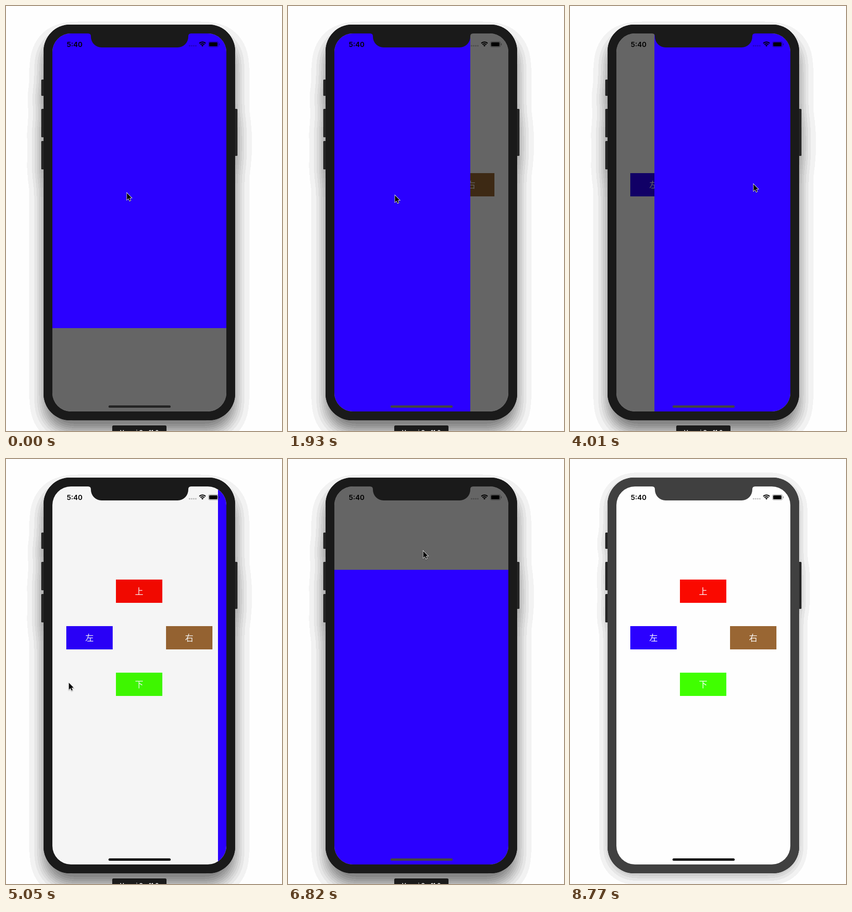
Animation of 595 by 913 pixels, one loop 8.87 s. Source, as an HTML page with a canvas:

```html
<!DOCTYPE html>
<html lang="zh">
<head>
<meta charset="utf-8">
<title>Slide-in panels</title>
<style>
  html, body { margin: 0; width: 100%; height: 100%; overflow: hidden; background: #fefefe; }
  canvas { display: block; }
</style>
</head>
<body>
<canvas id="stage" width="595" height="913"></canvas>
<script>
const W = 595, H = 913;
const LOOP = 8870, TICK = 148.1, BLUR_AT = 8770;
const BLUE = 'rgb(43,0,255)';
const ctx = document.getElementById('stage').getContext('2d');

const screen = { x: 100, y: 59, w: 375, h: 812 };
const PANEL_W = 293, PANEL_H = 633;

const buttons = [
  { text: '上', x: 237, y: 259, color: 'rgb(250,9,0)' },
  { text: '左', x: 130, y: 359, color: BLUE },
  { text: '右', x: 345, y: 359, color: 'rgb(153,102,51)' },
  { text: '下', x: 237, y: 459, color: 'rgb(64,255,0)' }
];

// Times are in ticks: first shaded tick, start of the closing slide.
const menus = [
  { side: 'top', open: -9, close: 4.3 },
  { side: 'left', open: 11, close: 18.54 },
  { side: 'right', open: 26, close: 32.4 },
  { side: 'bottom', open: 40, close: 47.2 }
];
const CLOSE_TICKS = 1.9;

// Pointer path: tick, x, y.
const path = [
  [0, 260, 401], [3, 232, 737], [7, 232, 737], [10, 190, 370], [12, 190, 370],
  [18, 429, 588], [20, 429, 588], [21, 405, 431], [22, 405, 431], [24, 395, 382],
  [28, 395, 382], [32, 135, 480], [34, 135, 480], [36, 274, 512], [38, 282, 484],
  [42, 282, 484], [44, 275, 350], [46, 291, 197], [49, 291, 197], [53, 535, 880]
];
const POINTER_END = 55;

function box(c, x, y, w, h, r, color) {
  c.beginPath();
  c.roundRect(x, y, w, h, r);
  c.fillStyle = color;
  c.fill();
}

function sideKeys(c) {
  c.roundRect(76, 158, 12, 35, 2.5);
  c.roundRect(76, 221, 12, 61, 2.5);
  c.roundRect(76, 290, 12, 61, 2.5);
  c.roundRect(487, 221, 12, 101, 2.5);
}

// Soft shadow of the device, rendered once in even tone steps.
function makeShadow(sigma, drop, alpha) {
  const layer = document.createElement('canvas');
  layer.width = W;
  layer.height = H;
  const c = layer.getContext('2d');
  c.shadowColor = `rgba(0,0,0,${alpha})`;
  c.shadowBlur = sigma * 2;
  c.shadowOffsetY = drop;
  c.beginPath();
  c.roundRect(81, 40, 413, 850, 57);
  sideKeys(c);
  c.fill();
  const image = c.getImageData(0, 0, W, H);
  for (let i = 3; i < image.data.length; i += 4) {
    image.data[i] = Math.round(image.data[i] / 12) * 12;
  }
  c.putImageData(image, 0, 0);
  return layer;
}

const activeShadow = makeShadow(18, 24, 0.55);
const idleShadow = makeShadow(13, 7, 0.3);

function menuState(tick) {
  const menu = menus.find(m => tick >= m.open && tick < m.close + CLOSE_TICKS);
  if (!menu) return { shade: 0, shown: 0 };
  if (tick === menu.open) return { side: menu.side, shade: 0.53, shown: 0 };
  const u = Math.max(0, (tick - menu.close) / CLOSE_TICKS);
  const p = 0.5 + 0.5 * Math.cos(Math.PI * u);
  return { side: menu.side, shade: p, shown: p };
}

function drawPanel({ side, shown }) {
  if (!shown) return;
  const { x, y, w, h } = screen;
  const dx = Math.round(PANEL_W * shown), dy = Math.round(PANEL_H * shown);
  ctx.fillStyle = BLUE;
  if (side === 'top') ctx.fillRect(x, y, w, dy);
  if (side === 'bottom') ctx.fillRect(x, y + h - dy, w, dy);
  if (side === 'left') ctx.fillRect(x, y, dx, h);
  if (side === 'right') ctx.fillRect(x + w - dx, y, dx, h);
}

function drawButtons() {
  ctx.font = '300 18px "Noto Sans CJK SC", "Noto Sans CJK", sans-serif';
  ctx.textAlign = 'center';
  for (const b of buttons) {
    ctx.fillStyle = b.color;
    ctx.fillRect(b.x, b.y, 100, 50);
    ctx.fillStyle = '#fefefe';
    ctx.fillText(b.text, b.x + 50, b.y + 32);
  }
}

function drawWifi(x, y) {
  const from = -Math.PI * 0.74, to = -Math.PI * 0.26;
  const ring = (outer, inner) => {
    ctx.beginPath();
    ctx.arc(x, y, outer, from, to);
    ctx.arc(x, y, inner, to, from, true);
    ctx.fill();
  };
  ring(11, 8.7);
  ring(7.3, 5);
  ring(3.6, 0);
}

function drawStatus() {
  ctx.fillStyle = '#000';
  ctx.font = '600 15px Inter, sans-serif';
  ctx.textAlign = 'left';
  ctx.fillText('5:40', 131, 87.5);
  drawWifi(423.5, 87.3);
  box(ctx, 438, 78, 18, 8.5, 1.5, '#000');
  ctx.strokeStyle = 'rgba(0,0,0,0.4)';
  ctx.lineWidth = 1;
  ctx.beginPath();
  ctx.roundRect(436.5, 76.5, 21.5, 11.5, 3);
  ctx.stroke();
  box(ctx, 459, 80, 1.5, 4.5, [0, 1.5, 1.5, 0], 'rgba(0,0,0,0.4)');
  ctx.fillStyle = 'rgba(0,0,0,0.22)';
  for (let i = 0; i < 4; i++) {
    ctx.beginPath();
    ctx.arc(395.7 + i * 4.5, 85.5, 1.8, 0, Math.PI * 2);
    ctx.fill();
  }
}

function drawNotch(color) {
  ctx.fillStyle = color;
  ctx.beginPath();
  ctx.moveTo(177, 58);
  ctx.lineTo(177, 59);
  ctx.quadraticCurveTo(183, 59, 183, 65);
  ctx.arcTo(183, 89, 207, 89, 23);
  ctx.lineTo(369, 89);
  ctx.arcTo(393, 89, 393, 65, 23);
  ctx.lineTo(393, 65);
  ctx.quadraticCurveTo(393, 59, 399, 59);
  ctx.lineTo(399, 58);
  ctx.fill();
}

function drawScreen(state) {
  const { x, y, w, h } = screen;
  ctx.save();
  ctx.beginPath();
  ctx.roundRect(x, y, w, h, 40);
  ctx.clip();
  ctx.fillStyle = '#fefefe';
  ctx.fillRect(x, y, w, h);
  drawButtons();
  ctx.fillStyle = `rgba(0,0,0,${0.6 * state.shade})`;
  ctx.fillRect(x, y, w, h);
  drawPanel(state);
  drawStatus();
  const tone = Math.round((state.side === 'top' ? 36 : 68) * state.shown ** 2);
  box(ctx, 221, 858, 134, 5, 2.5, `rgb(${tone},${tone},${tone})`);
  ctx.restore();
}

function drawLabel() {
  box(ctx, 229, 901, 117, 24, 3, 'rgb(27,27,27)');
  ctx.fillStyle = '#fff';
  ctx.font = '600 12px Inter, sans-serif';
  ctx.textAlign = 'center';
  ctx.fillText('Vonari Q – 11.2', 287.5, 919.5);
}

function drawPointer(tick) {
  if (tick >= POINTER_END) return;
  let i = path.findIndex(k => k[0] > tick);
  if (i < 0) i = path.length - 1;
  const [t0, x0, y0] = path[i - 1], [t1, x1, y1] = path[i];
  const u = Math.min(1, (tick - t0) / (t1 - t0));
  ctx.save();
  ctx.translate(Math.round(x0 + (x1 - x0) * u) + 0.6, Math.round(y0 + (y1 - y0) * u) + 0.8);
  ctx.beginPath();
  ctx.moveTo(0, 0);
  ctx.lineTo(0, 14.6);
  ctx.lineTo(3.4, 11.4);
  ctx.lineTo(5.8, 16.8);
  ctx.lineTo(8, 15.8);
  ctx.lineTo(5.7, 10.6);
  ctx.lineTo(10.2, 10.4);
  ctx.closePath();
  ctx.lineWidth = 1.6;
  ctx.strokeStyle = '#fff';
  ctx.shadowColor = 'rgba(0,0,0,0.4)';
  ctx.shadowBlur = 2;
  ctx.shadowOffsetY = 1;
  ctx.stroke();
  ctx.shadowColor = 'transparent';
  ctx.fillStyle = '#000';
  ctx.fill();
  ctx.restore();
}

function draw(ms) {
  const tick = Math.floor((ms + 6) / TICK);
  const active = ms < BLUR_AT;
  const bodyColor = active ? 'rgb(26,26,26)' : 'rgb(64,64,64)';
  ctx.fillStyle = '#fefefe';
  ctx.fillRect(0, 0, W, H);
  ctx.drawImage(active ? activeShadow : idleShadow, 0, 0);
  ctx.beginPath();
  sideKeys(ctx);
  ctx.fillStyle = 'rgb(38,38,38)';
  ctx.fill();
  box(ctx, 81, 40, 413, 850, 57, bodyColor);
  drawScreen(menuState(tick));
  drawNotch(bodyColor);
  if (active) drawLabel();
  drawPointer(tick);
}

const start = performance.now();
function loop() {
  draw((performance.now() - start) % LOOP);
  requestAnimationFrame(loop);
}
loop();
</script>
</body>
</html>
```
